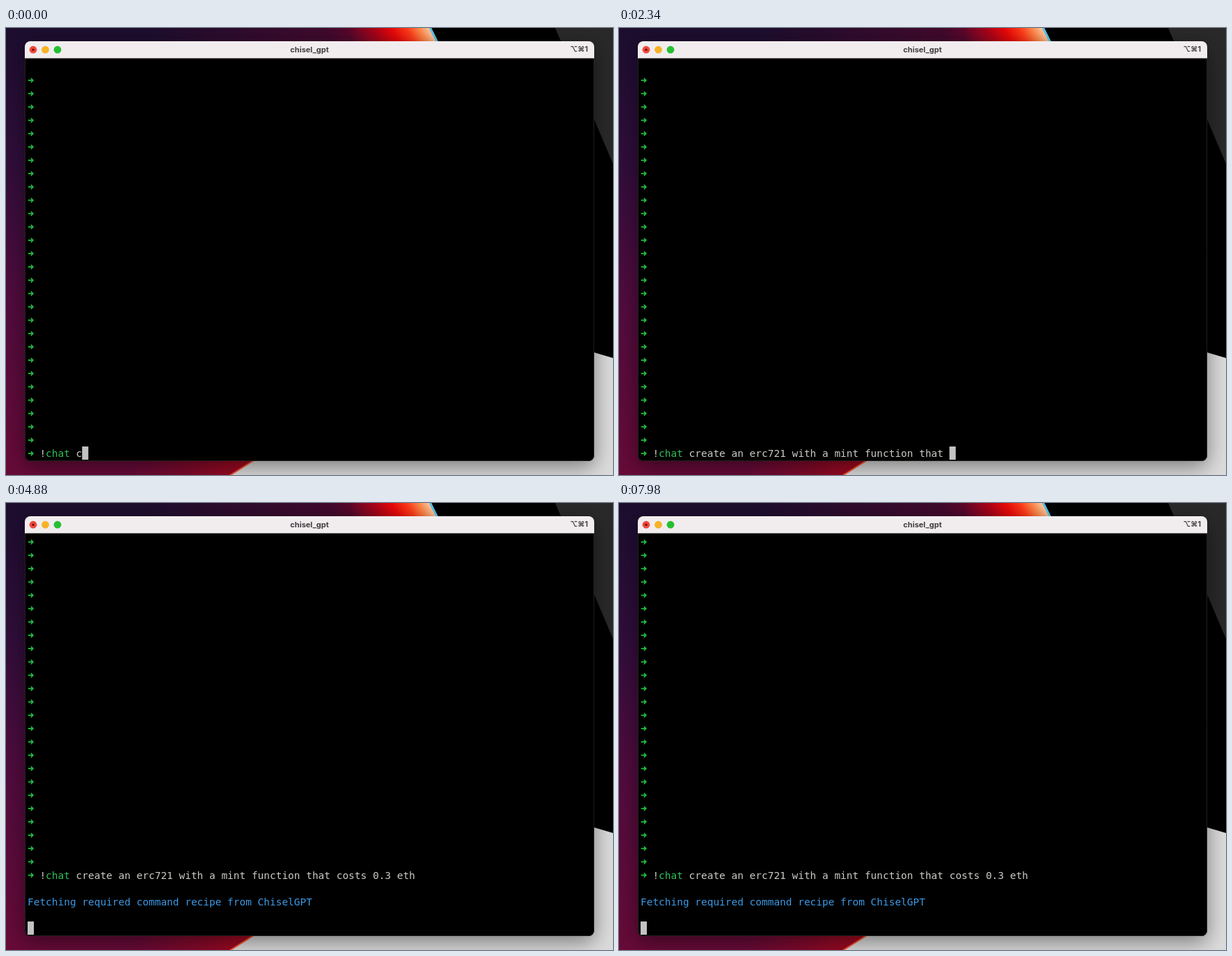
These frames come from a looping animation (872x642 px, 8 s). An HTML page with a canvas:

```html
<!DOCTYPE html>
<html lang="en">
<head>
<meta charset="utf-8">
<title>chisel_gpt</title>
<style>
  html, body { margin: 0; width: 100%; height: 100%; overflow: hidden; background: #000; }
  canvas { display: block; width: 872px; height: 642px; }
</style>
</head>
<body>
<canvas id="stage" width="872" height="642"></canvas>
<script>
const W = 872, H = 642, LOOP = 8000, ENTER = 3280;
const WIN = { x: 27, y: 19, w: 818, h: 603, r: 8, bar: 24.5 };
const CELL = 8.7, ROW = 19.14, LEFT = 31, TOP = 56, LAST = 29;
const MONO = '14.45px "DejaVu Sans Mono", monospace';
const GREY = '#cbcbc6', GREEN = '#2fc157', ARROW = '#22bd3f', BLUE = '#3b9ae6';
const COMMAND = '!chat create an erc721 with a mint function that costs 0.3 eth';
const REPLY = 'Fetching required command recipe from ChiselGPT';

const ctx = document.getElementById('stage').getContext('2d');
const backdrop = document.createElement('canvas');
backdrop.width = W;
backdrop.height = H;

function poly(c, fill, ...pts) {
  c.fillStyle = fill;
  c.beginPath();
  pts.forEach(([x, y]) => c.lineTo(x, y));
  c.closePath();
  c.fill();
}

function line(c, color, width, x1, y1, x2, y2) {
  c.strokeStyle = color;
  c.lineWidth = width;
  c.beginPath();
  c.moveTo(x1, y1);
  c.lineTo(x2, y2);
  c.stroke();
}

function dot(c, x, y, r, fill) {
  c.fillStyle = fill;
  c.beginPath();
  c.arc(x, y, r, 0, Math.PI * 2);
  c.fill();
}

function gradient(c, x1, y1, x2, y2, stops) {
  const g = c.createLinearGradient(x1, y1, x2, y2);
  stops.forEach(([at, color]) => g.addColorStop(at, color));
  return g;
}

function drawWallpaper(c) {
  c.fillStyle = '#000';
  c.fillRect(0, 0, W, H);

  // purple field on the left
  const field = gradient(c, 0, 0, 0, H,
    [[0, '#1c0d2e'], [0.3, '#300d3a'], [0.6, '#500b3e'], [1, '#680a38']]);
  poly(c, field, [0, 0], [608, 0], [619, 21], [619, 400], [355, 622], [322, H], [0, H]);

  // red ridge along the top
  const ridge = gradient(c, 493, 60.6, 608, 0,
    [[0, 'rgba(80,6,40,0)'], [0.25, '#6a0628'], [0.45, '#a80318'], [0.63, '#e80808'],
     [0.78, '#ff3a18'], [0.9, '#ff8a4c'], [1, '#ffc9a0']]);
  poly(c, ridge, [400, 0], [608, 0], [619, 21], [400, 21]);
  const haze = gradient(c, 200, 0, 520, 0, [[0, 'rgba(90,6,42,0)'], [1, 'rgba(90,6,42,.7)']]);
  poly(c, haze, [200, 0], [500, 0], [490, 21], [200, 21]);
  line(c, '#5cc8ee', 3, 609, -1, 620, 21);

  // dark slab, upper right
  poly(c, '#292929', [789, 0], [W, 0], [W, 195]);

  // red glow and pale slab at the bottom
  const glow = gradient(c, 180, 0, 345, 0, [[0, 'rgba(150,8,30,0)'], [1, 'rgba(170,8,28,.9)']]);
  poly(c, glow, [180, 610], [375, 610], [322, H], [180, H]);
  poly(c, '#dcdcdc', [322, H], [375, 610], [800, 452], [845, 466], [W, 474], [W, H]);
  line(c, '#ff5a35', 2, 321, H + 1, 375, 609);
}

function drawWindow(c) {
  const { x, y, w, h, r, bar } = WIN;
  c.save();
  c.shadowColor = 'rgba(0,0,0,.45)';
  c.shadowBlur = 30;
  c.shadowOffsetY = 8;
  c.fillStyle = '#000';
  c.beginPath();
  c.roundRect(x, y, w, h, r);
  c.fill();
  c.restore();

  c.strokeStyle = '#20201c';
  c.lineWidth = 1;
  c.beginPath();
  c.roundRect(x + 0.5, y + 0.5, w - 1, h - 1, r);
  c.stroke();

  c.fillStyle = '#f1edef';
  c.beginPath();
  c.roundRect(x, y, w, bar, [r, r, 0, 0]);
  c.fill();

  ['#ee4a3e', '#f6b327', '#25c032'].forEach((color, i) => dot(c, 39 + 17.5 * i, 31.2, 5.4, color));
  dot(c, 39, 31.2, 1.8, '#7c0d08');

  c.fillStyle = '#403d40';
  c.textBaseline = 'alphabetic';
  c.textAlign = 'center';
  c.font = 'bold 11px Inter, sans-serif';
  c.fillText('chisel_gpt', 436, 35);
  c.textAlign = 'right';
  c.font = 'bold 10.5px Inter, "DejaVu Sans", sans-serif';
  c.fillText('⌥⌘1', 836, 34);
}

const rowY = row => TOP + row * ROW;

// each character sits in its own terminal cell
function type(text, col, row, color) {
  ctx.fillStyle = color;
  [...text].forEach((ch, i) => {
    if (ch !== ' ') ctx.fillText(ch, LEFT + (col + i) * CELL, rowY(row) + 5);
  });
}

function prompt(row) {
  const y = rowY(row);
  line(ctx, ARROW, 1.8, 31.8, y, 37.5, y);
  poly(ctx, ARROW, [35.4, y - 3.4], [36.6, y - 3.4], [40, y], [36.6, y + 3.4], [35.4, y + 3.4], [36.8, y]);
}

function cursor(col, row) {
  ctx.fillStyle = '#c3c3c3';
  ctx.fillRect(LEFT + col * CELL, rowY(row) - 10, 9, 19);
}

function typedCount(t) {
  const n = t < 880 ? 7 + t / 58.5 : 22 + (t - 880) / 53.5;
  return Math.min(COMMAND.length, Math.floor(n));
}

function drawCommand(row, count) {
  const text = COMMAND.slice(0, count);
  type(text.slice(0, 1), 2, row, GREY);
  type(text.slice(1, 5), 3, row, GREEN);
  type(text.slice(5), 7, row, GREY);
}

function draw(t) {
  ctx.drawImage(backdrop, 0, 0);
  ctx.font = MONO;
  ctx.textAlign = 'left';
  ctx.textBaseline = 'alphabetic';

  const sent = t >= ENTER;
  const count = typedCount(t);
  const row = sent ? LAST - 4 : LAST;
  for (let i = sent ? 0 : 1; i <= row; i++) prompt(i);
  drawCommand(row, count);
  if (sent) {
    type(REPLY, 0, row + 2, BLUE);
    cursor(0, LAST);
  } else {
    cursor(2 + count, LAST);
  }
}

const back = backdrop.getContext('2d');
drawWallpaper(back);
drawWindow(back);

const start = performance.now();
function tick() {
  draw((performance.now() - start) % LOOP);
  requestAnimationFrame(tick);
}
tick();
</script>
</body>
</html>
```
